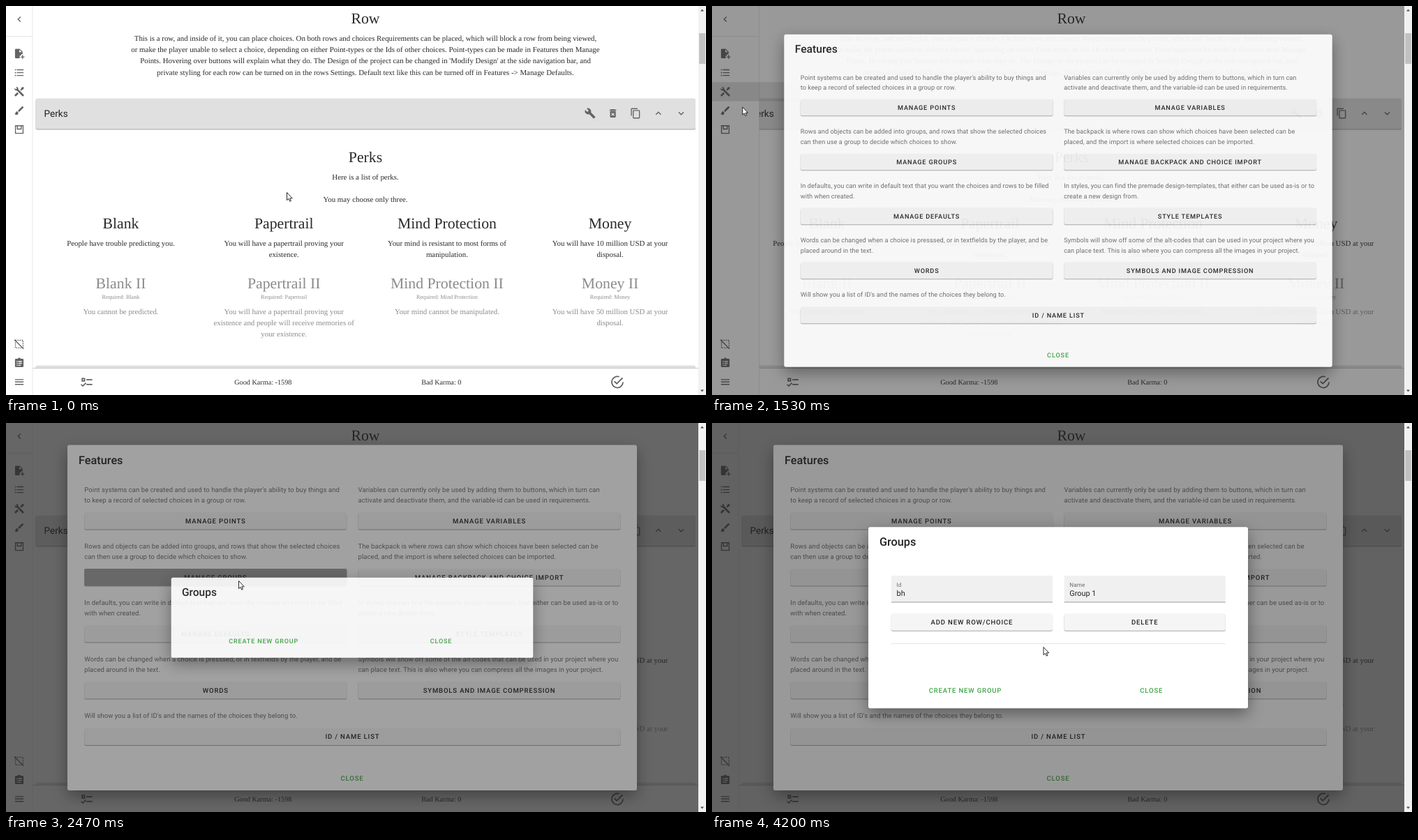
An HTML page that plays this animation: 1003x558 px, repeating every 4940 ms.

```html
<!DOCTYPE html>
<html lang="en">
<head>
<meta charset="utf-8">
<title>Groups walkthrough</title>
<style>
  html, body { margin: 0; width: 100%; height: 100%; overflow: hidden; background: #fff; }
  svg { display: block; text-rendering: geometricPrecision; }
  #stage { width: 100%; height: 100%; }
  text { font-family: Roboto, sans-serif; fill: #222; text-anchor: middle; white-space: pre; }
  .serif { font-family: "Liberation Serif", serif; fill: #2a2a2a; }
  .left { text-anchor: start; }
  .bold { font-weight: 500; }
  .btn { font-weight: 500; letter-spacing: .0893em; }
  .green { fill: #3fa445; }
  .body { fill: #6c6c6c; letter-spacing: .0071em; }
  .raised { filter: drop-shadow(0 1.2px .6px rgba(0,0,0,.34)); }
  .dialog { filter: drop-shadow(0 8px 11px rgba(0,0,0,.4)); }
  .icon { fill: #646464; fill-rule: evenodd; }
</style>
</head>
<body>
<svg id="stage" viewBox="0 0 1003 558" preserveAspectRatio="none"></svg>
<script>
const LOOP = 4940, MINI = 38, WIDE = 174;
const BODY = 10.87, HEAD = 21.75, UI = 9.52;

const ICONS = {
  left: 'M15.4,16.6L10.8,12L15.4,7.4L14,6L8,12L14,18Z',
  up: 'M7.4,15.4L12,10.8L16.6,15.4L18,14L12,8L6,14Z',
  down: 'M7.4,8.6L12,13.2L16.6,8.6L18,10L12,16L6,10Z',
  wrench: 'M22.7,19L13.6,9.9C14.5,7.6 14,4.9 12.1,3C10.1,1 7.1,.6 4.7,1.7L9,6L6,9L1.6,4.7C.4,7.1 .9,10.1 2.9,12.1C4.8,14 7.5,14.5 9.8,13.6L18.9,22.7C19.3,23.1 19.9,23.1 20.3,22.7L22.6,20.4C23.1,20 23.1,19.3 22.7,19Z',
  trash: 'M6,7H18V19A2,2 0 0,1 16,21H8A2,2 0 0,1 6,19ZM8.5,11.9L10.6,14L8.5,16.1L9.9,17.5L12,15.4L14.1,17.5L15.5,16.1L13.4,14L15.5,11.9L14.1,10.5L12,12.6L9.9,10.5ZM15.5,4L14.5,3H9.5L8.5,4H5V6H19V4Z',
  copy: 'M19,21H8V7H19M19,5H8A2,2 0 0,0 6,7V21A2,2 0 0,0 8,23H19A2,2 0 0,0 21,21V7A2,2 0 0,0 19,5M16,1H4A2,2 0 0,0 2,3V17H4V3H16Z',
  add: 'M5,2H13L19,8V13H16V16H13V22H5A2,2 0 0,1 3,20V4A2,2 0 0,1 5,2M12,3.5V9H17.5ZM18,15H20V18H23V20H20V23H18V20H15V18H18Z',
  list: 'M7,5H21V7H7ZM7,11H21V13H7ZM7,17H21V19H7ZM2.8,4.8H5.2V7.2H2.8ZM2.8,10.8H5.2V13.2H2.8ZM2.8,16.8H5.2V19.2H2.8Z',
  tools: 'M21.7,20.3L20.3,21.7A1,1 0 0 1 18.9,21.7L7,9.9A3.8,3.8 0 0 1 6,10A4,4 0 0 1 2.2,4.7L4.8,7.2L7.2,4.8L4.7,2.2A4,4 0 0 1 10,6A3.8,3.8 0 0 1 9.9,7L21.7,18.9A1,1 0 0 1 21.7,20.3M2.3,18.9A1,1 0 0 0 2.3,20.3L3.7,21.7A1,1 0 0 0 5.1,21.7L10.6,16.2L7.8,13.4M20,2L16,4V6L13.8,8.2L15.8,10.2L18,8H20L22,4Z',
  brush: 'M20.7,4.6L19.4,3.3C19,2.9 18.4,2.9 18,3.3L9,12.2L11.8,15L20.7,6C21.1,5.6 21.1,5 20.7,4.6M7,14A3,3 0 0,0 4,17C4,18.3 2.8,19 2,19C2.9,20.2 4.5,21 6,21A4,4 0 0,0 10,17A3,3 0 0,0 7,14Z',
  save: 'M3,3H21V21H3ZM5,5V19H19V5H17V12H7V5ZM9,5V10H15V5Z',
  clip: 'M5,3H9.2A3,3 0 0 1 14.8,3H19A2,2 0 0 1 21,5V19A2,2 0 0 1 19,21H5A2,2 0 0 1 3,19V5A2,2 0 0 1 5,3M6.5,8V10H8.5V8ZM10,8V10H17.5V8ZM6.5,12V14H8.5V12ZM10,12V14H17.5V12ZM6.5,16V18H8.5V16ZM10,16V18H15V16Z',
  menu: 'M3,6H21V8H3ZM3,11H21V13H3ZM3,16H21V18H3Z',
  checks: 'M3,5H9V11H3ZM5,7V9H7V7ZM11,7H21V9H11ZM11,15H21V17H11ZM5,20L1.5,16.5L2.9,15.1L5,17.2L9.6,12.6L11,14Z',
  done: 'M20,12A8,8 0 1,1 14.2,4.3L15.8,2.7A10,10 0 1,0 22,12ZM7.9,10.1L6.5,11.5L11,16L21,6L19.6,4.6L11,13.2Z'
};

// y is the visual middle of the line
const text = (x, y, str, size, cls = '') => {
  const drop = cls.includes('serif') ? .33 : .345;
  return `<text x="${x}" y="${(y + size * drop).toFixed(2)}" font-size="${size}" class="${cls}">${str}</text>`;
};
const lines = (x, y, step, list, size, cls) =>
  list.map((s, i) => text(x, y + i * step, s, size, cls)).join('');
const rect = (x, y, w, h, fill, more = '') =>
  `<rect x="${x}" y="${y}" width="${w}" height="${h}" fill="${fill}" ${more}/>`;
const icon = (name, x, y, size = 16.3) =>
  `<path class="icon" d="${ICONS[name]}" transform="translate(${x - size / 2} ${y - size / 2}) scale(${size / 24})"/>`;
const button = (x, y, w, label, id = '') =>
  rect(x, y, w, 24.5, '#f5f5f5', `rx="2.5" class="raised" ${id && `id="${id}"`}`) +
  (id ? ripple(id + 'Rip', x, y, w, 24.5, '#000') : '') +
  text(x + w / 2, y + 12.3, label, UI, 'btn');
const ripple = (id, x, y, w, h, fill) =>
  `<svg x="${x}" y="${y}" width="${w}" height="${h}"><circle id="${id}" fill="${fill}"/></svg>`;

const INTRO = [
  'This is a row, and inside of it, you can place choices. On both rows and choices Requirements can be placed, which will block a row from being viewed,',
  'or make the player unable to select a choice, depending on either Point-types or the Ids of other choices. Point-types can be made in Features then Manage',
  "Points. Hovering over buttons will explain what they do. The Design of the project can be changed in 'Modify Design' at the side navigation bar, and",
  'private styling for each row can be turned on in the rows Settings. Default text like this can be turned off in Features -&gt; Manage Defaults.'
];
const PERKS = [
  ['Blank', ['People have trouble predicting you.'], ['You cannot be predicted.']],
  ['Papertrail', ['You will have a papertrail proving your', 'existence.'],
    ['You will have a papertrail proving your', 'existence and people will receive memories of', 'your existence.']],
  ['Mind Protection', ['Your mind is resistant to most forms of', 'manipulation.'], ['Your mind cannot be manipulated.']],
  ['Money', ['You will have 10 million USD at your', 'disposal.'], ['You will have 50 million USD at your', 'disposal.']]
];
const FEATURES = [
  ['MANAGE POINTS', "Point systems can be created and used to handle the player's ability to buy things and", 'to keep a record of selected choices in a group or row.'],
  ['MANAGE VARIABLES', 'Variables can currently only be used by adding them to buttons, which in turn can', 'activate and deactivate them, and the variable-id can be used in requirements.'],
  ['MANAGE GROUPS', 'Rows and objects can be added into groups, and rows that show the selected choices', 'can then use a group to decide which choices to show.'],
  ['MANAGE BACKPACK AND CHOICE IMPORT', 'The backpack is where rows can show which choices have been selected can be', 'placed, and the import is where selected choices can be imported.'],
  ['MANAGE DEFAULTS', 'In defaults, you can write in default text that you want the choices and rows to be filled', 'with when created.'],
  ['STYLE TEMPLATES', 'In styles, you can find the premade design-templates, that either can be used as-is or to', 'create a new design from.'],
  ['WORDS', 'Words can be changed when a choice is presssed, or in textfields by the player, and be', 'placed around in the text.'],
  ['SYMBOLS AND IMAGE COMPRESSION', 'Symbols will show off some of the alt-codes that can be used in your project where you', 'can place text. This is also where you can compress all the images in your project.']
];
const MENU = [
  ['left', 19, 'Return To Menu'], ['add', 68.3, 'Create New Row'], ['list', 95.6, 'Open Row List'],
  ['tools', 122.8, 'Open Features'], ['brush', 150, 'Modify Design'], ['save', 177.2, 'Save/Load Project'],
  ['', 485, 'Clean Selected Choices'], ['clip', 512, 'See ID/Title List'], ['menu', 539.3, 'Use Alternate Menu']
];

function pageArt() {
  const perks = PERKS.map(([name, desc, next], i) => {
    const x = 164.5 + i * 233.7;
    return text(x, 312.2, name, HEAD, 'serif') + lines(x, 340.4, 16.3, desc, BODY, 'serif') +
      '<g opacity=".54">' + text(x, 398.2, name + ' II', HEAD, 'serif') +
      text(x, 417.3, 'Required: ' + name, 8.2, 'serif') + lines(x, 438.2, 16.3, next, BODY, 'serif') + '</g>';
  }).join('');
  const bar = y => rect(42.5, y, 945.5, 44, '#e0e0e0', 'rx="2.5" class="raised"');
  return text(515, 18, 'Row', HEAD, 'serif') + lines(515, 46.2, 16.3, INTRO, BODY, 'serif') +
    bar(132.5) + text(54.5, 154.2, 'Perks', 13.6, 'left') +
    ['wrench', 'trash', 'copy', 'up', 'down'].map((n, i) => icon(n, 837 + i * 32.6, 154)).join('') +
    text(515, 216.4, 'Perks', HEAD, 'serif') + text(515, 245.3, 'Here is a list of perks.', BODY, 'serif') +
    text(515, 277.9, 'You may choose only three.', BODY, 'serif') + perks +
    bar(515.5) + rect(MINI, 520, 954, 38, '#fff') + rect(MINI, 519.2, 954, .9, '#c4c4c4') +
    icon('checks', 116, 539.5, 20.5) + text(368.3, 539.6, 'Good Karma: -1598', 10.2, 'serif') +
    text(623.8, 539.6, 'Bad Karma: 0', 10.2, 'serif') + icon('done', 876, 539.5, 21.5);
}

function drawerArt() {
  const dashed = `<g transform="translate(10.8 476.8) scale(.68)" fill="none" stroke="#646464" stroke-width="2">
    <path d="M4,4H20V20H4Z" stroke-dasharray="2.4 2"/><path d="M2,3L21,22"/></g>`;
  return rect(0, 0, MINI, 558, '#fff', 'id="panel"') + rect(0, 0, .8, 558, '#e2e2e2', 'id="edge"') +
    rect(0, 43, MINI, .8, '#e2e2e2', 'id="rule"') + rect(0, 109.3, MINI, 27.2, '#000', 'id="row"') +
    ripple('rowRip', 0, 109.3, WIDE, 27.2, '#000') +
    MENU.map(([n, y]) => n ? icon(n, 19, y) : dashed).join('') +
    MENU.map(([, y]) => text(0, y, '', 8.84, 'bold label')).join('');
}

function featuresArt() {
  return rect(88, 31.5, 816, 495.5, '#fff', 'rx="2.7" class="dialog"') + text(104, 53.3, 'Features', 16.3, 'left bold') +
    FEATURES.map(([label, ...desc], i) => {
      const x = i % 2 ? 504.5 : 112.3, y = 95.5 + (i >> 1) * 81;
      return lines(x, y, 14.9, desc, UI, 'left body') + button(x, y + 32.5, 376, label, i === 2 ? 'groupsBtn' : '');
    }).join('') +
    text(112.3, 419.5, "Will show you a list of ID's and the names of the choices they belong to.", UI, 'left body') +
    button(112.3, 437.5, 768.2, 'ID / NAME LIST') + text(496, 509.7, 'CLOSE', UI, 'btn green');
}

function groupsArt() {
  const field = (x, name, value) => rect(x, 219, 231.3, 38, '#f0f0f0', 'rx="2.5"') + rect(x, 256.6, 231.3, .8, '#858585') +
    text(x + 7.8, 231.7, name, 8.16, 'left body') + text(x + 7.8, 244.3, value, BODY, 'left');
  return rect(224, 0, 544, 0, '#fff', 'rx="2.7" class="dialog" id="card"') +
    '<g id="cardTop">' + text(240, 21.5, 'Groups', 16.3, 'left bold') + '</g>' +
    '<g id="form">' + field(256.8, 'Id', 'bh') + field(504.5, 'Name', 'Group 1') +
    button(256.8, 273.2, 231.3, 'ADD NEW ROW/CHOICE') + button(504.5, 273.2, 231.3, 'DELETE') +
    rect(256.8, 316.3, 479, .8, '#dcdcdc') + '</g>' +
    '<g id="cardEnd">' + rect(239, -37.7, 248, 24.5, '#2e8b34', 'rx="2.5" id="createBg"') +
    ripple('createRip', 239, -37.7, 248, 24.5, '#4caf50') +
    text(363, -25.3, 'CREATE NEW GROUP', UI, 'btn green') + text(629.8, -25.3, 'CLOSE', UI, 'btn green') + '</g>';
}

const cursorArt = `<g id="cursor" stroke="#111" fill="#fff" stroke-width=".9" stroke-linejoin="round">
  <path id="arrow" d="M.5,.5V11.6L3,9.4L4.7,13.2L6.4,12.4L4.8,8.8H8.2Z"/>
  <path id="hand" d="M1.6,1.6A1.1,1.1 0 0 1 3.8,1.6V5.2L5.9,5.5L8.3,6.2L9.6,7V10L8.4,14H2.6L-1,9.4Q-1.6,7.9 0,8L1.6,9.2ZM5.9,5.5V7.4M8.1,6.2V8"/></g>`;

const scrollbar = rect(992, 0, 11, 558, '#f1f1f1') + rect(993.2, 39, 8.8, 44, '#c1c1c1') +
  '<path fill="#505050" d="M995,7.5L997.5,4.5L1000,7.5ZM995,550.5L997.5,553.5L1000,550.5Z"/>';

document.getElementById('stage').innerHTML = pageArt() + drawerArt() +
  rect(0, 0, 992, 558, '#212121', 'id="shade1"') + `<g id="features">${featuresArt()}</g>` +
  rect(0, 0, 992, 558, '#212121', 'id="shade2"') + `<g id="groups">${groupsArt()}</g>` + scrollbar + cursorArt;

const el = {};
document.querySelectorAll('[id]').forEach(n => el[n.id] = n);
const labels = [...document.querySelectorAll('.label')];
const set = (id, attrs) => { for (const k in attrs) el[id].setAttribute(k, attrs[k]); };
const show = (id, on) => { el[id].style.display = on ? '' : 'none'; };

const clamp = v => Math.min(1, Math.max(0, v));
const span = (t, from, to) => clamp((t - from) / (to - from));
const smooth = u => u * u * (3 - 2 * u);
const mix = (a, b, u) => a + (b - a) * u;
const bezier = (x1, y1, x2, y2) => x => {
  const at = (a, b, s) => 3 * a * s * (1 - s) ** 2 + 3 * b * s * s * (1 - s) + s ** 3;
  let lo = 0, hi = 1;
  for (let i = 0; i < 24; i++) {
    const m = (lo + hi) / 2;
    if (at(x1, x2, m) < x) lo = m; else hi = m;
  }
  return at(y1, y2, hi);
};
const standard = bezier(.4, 0, .2, 1), swift = bezier(.25, .8, .25, 1);

const pen = document.createElement('canvas').getContext('2d');
function fit(str, max) {
  pen.font = '500 88.4px Roboto, sans-serif';
  const width = s => pen.measureText(s).width / 10;
  if (width(str) <= max) return str;
  let n = str.length;
  while (n && width(str.slice(0, n).trimEnd() + '…') > max + .6) n--;
  return n ? str.slice(0, n).trimEnd() + '…' : '';
}

// start, end, from, bend, to
const MOVES = [
  [230, 830, [402, 267], [212, 196], [22, 125]],
  [1420, 1980, [22, 125], [120, 225], [333, 226]],
  [2560, 3090, [333, 226], [402, 285], [359.5, 321]],
  [3420, 4170, [359.5, 321], [417, 321], [474.5, 321]]
];
function cursorAt(t) {
  const [t0, t1, a, b, c] = MOVES.filter(m => t >= m[0]).pop() || MOVES[0];
  const u = smooth(span(t, t0, t1));
  return [0, 1].map(i => (1 - u) ** 2 * a[i] + 2 * u * (1 - u) * b[i] + u * u * c[i]);
}

function spread(id, t, start, fade, [x0, x1], y, size, alpha) {
  const p = standard(span(t, start, start + 250));
  set(id, { cx: mix(x0, x1, p), cy: y, r: size * p, opacity: alpha * (1 - span(t, fade, fade + 280)) });
}

function pop(id, t, start) {
  const p = swift(span(t, start, start + 300)), s = .5 + p / 2;
  show(id, t >= start);
  set(id, { transform: `translate(496 279.3) scale(${s}) translate(-496 -279.3)`, opacity: p });
}

function drawDrawer(t) {
  const open = standard(span(t, 842, 1042)) - standard(span(t, 1430, 1630));
  const w = mix(MINI, WIDE, open);
  set('panel', { width: w });
  set('edge', { x: w - .4 });
  set('rule', { width: w });
  set('row', { width: w, opacity: .035 * span(t, 800, 900) * (1 - span(t, 1450, 1650)) + (t > 1330 && t < 1450 ? .025 : 0) });
  spread('rowRip', t, 1327, 1430, [22, 30], 14, 100, .17);
  labels.forEach((n, i) => {
    n.textContent = open > 0 ? fit(MENU[i][2], w - MINI - 22) : '';
    n.setAttribute('x', (MINI + w) / 2);
  });
  set('shade1', { x: t < 1430 ? w : 0, opacity: .46 * standard(span(t, 1341, 1541)) });
}

function drawDialogs(t) {
  pop('features', t, 1388);
  const hover = span(t, 1820, 2100) * .08 + span(t, 2220, 2300) * .08 - span(t, 2480, 2750) * .16;
  const grey = Math.round(245 * (1 - hover));
  set('groupsBtn', { fill: `rgb(${grey},${grey},${grey})` });
  el.groupsBtn.style.filter = hover > .03 && t < 2460 ? 'drop-shadow(0 2px 2px rgba(0,0,0,.45))' : '';
  spread('groupsBtnRip', t, 2220, 2480, [221, 188], 14, 190, .25);

  set('shade2', { opacity: .46 * standard(span(t, 2339, 2539)) });
  pop('groups', t, 2339);
  const grown = t >= 3340, top = grown ? 149.2 : 219, end = grown ? 409.3 : 339.7;
  set('card', { y: top, height: end - top });
  set('cardTop', { transform: `translate(0 ${top})` });
  set('cardEnd', { transform: `translate(0 ${end})` });
  show('form', grown);
  set('createBg', { opacity: .08 * span(t, 2900, 3100) * (1 - span(t, 3400, 3600)) });
  spread('createRip', t, 3220, 3420, [121, 124], 14, 124, .27);
}

function draw(t) {
  drawDrawer(t);
  drawDialogs(t);
  const [x, y] = cursorAt(t);
  const hand = [[800, 1335], [1800, 2290], [2900, 3340]].some(([a, b]) => t >= a && t < b);
  show('hand', hand);
  show('arrow', !hand);
  set('cursor', { transform: `translate(${x} ${y})` });
}

const begin = performance.now();
function tick() {
  draw((performance.now() - begin) % LOOP);
  requestAnimationFrame(tick);
}
tick();
</script>
</body>
</html>
```
